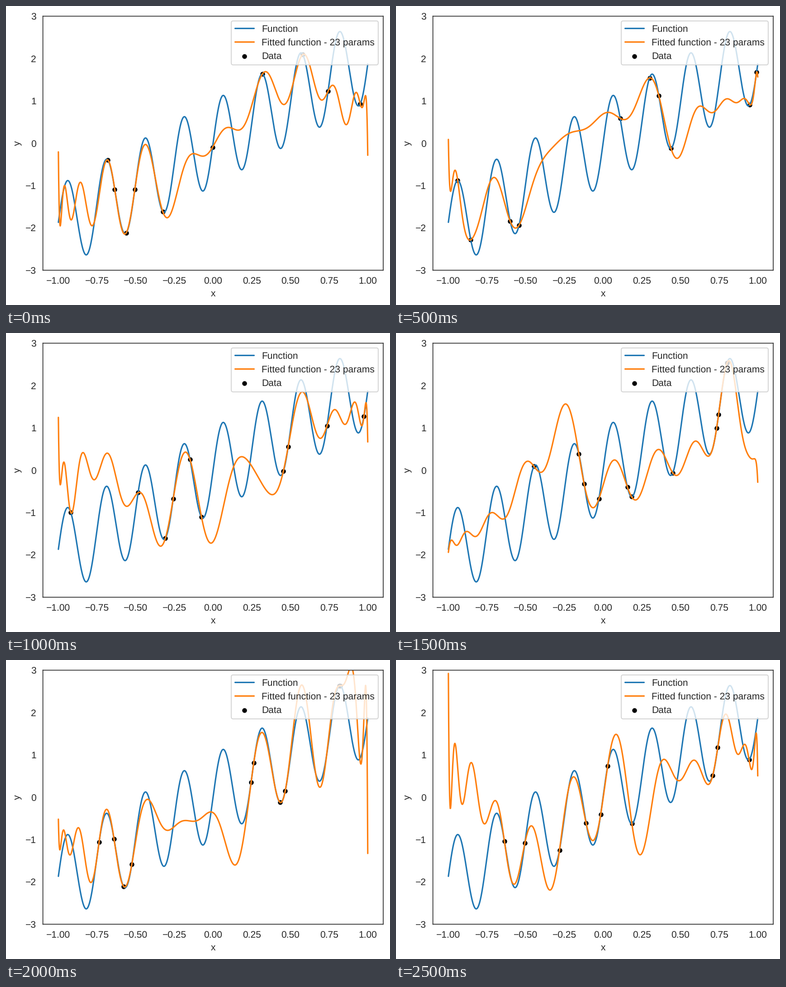
Animation of 849x660 px, one loop 3 s. Source, as a matplotlib script:

```python
import numpy as np
import matplotlib.pyplot as plt
from matplotlib.animation import FuncAnimation
from numpy.polynomial.legendre import legvander

W, H, DPI = 849, 660, 128
PT = 151.7 / DPI  # scale from nominal points to this stage
PARAMS = 23
INK = "0.15"

plt.rcParams.update({
    "font.family": "Liberation Sans",
    "font.size": 10 * PT,
    "text.color": INK,
    "text.hinting": "none",
    "axes.labelcolor": INK,
    "axes.edgecolor": INK,
    "axes.linewidth": 0.8 * PT,
    "axes.labelpad": 4 * PT,
    "lines.linewidth": 1.5 * PT,
    "lines.solid_capstyle": "round",
    "patch.linewidth": 1.0 * PT,
})
for side in ("xtick", "ytick"):
    plt.rcParams.update({
        f"{side}.color": INK,
        f"{side}.major.size": 3.5 * PT,
        f"{side}.major.pad": 3.5 * PT,
    })

# Ten sample positions per fit
SAMPLES = np.array([
    [-.681, -.6354, -.562, -.5059, -.3254, -.0036, .318, .58, .7435, .9515],
    [-.9395, -.8553, -.6005, -.5434, .1107, .3005, .3605, .4392, .949, .9927],
    [-.9197, -.4845, -.308, -.2577, -.1491, -.0747, .4543, .4853, .7364, .9755],
    [-.4467, -.1566, -.1226, -.0269, .1575, .1845, .4506, .734, .7466, .8016],
    [-.7369, -.6405, -.5784, -.525, .2459, .2629, .432, .4663, .816, .823],
    [-.6378, -.5055, -.2815, -.1095, -.0154, .0298, .1863, .7088, .7415, .9436],
])


def func(x):
    return 2 * x + np.sin(25 * x)


def features(x):
    """Legendre polynomials of degree 1 to PARAMS."""
    return legvander(x, PARAMS)[:, 1:]


def fit(x):
    """Smallest-norm coefficients that pass through every sample."""
    return np.linalg.lstsq(features(x), func(x), rcond=None)[0]


grid = np.linspace(-1, 1, 1000)
curves = [features(grid) @ fit(x) for x in SAMPLES]

fig = plt.figure(figsize=(W / DPI, H / DPI), dpi=DPI, facecolor="white")
ax = fig.add_axes([81.6 / W, 1 - 583.3 / H, 752.4 / W, 560.8 / H])
ax.set(xlim=(-1.1, 1.1), ylim=(-3, 3), xlabel="x", ylabel="y",
       xticks=np.linspace(-1, 1, 9), yticks=range(-3, 4))
ax.tick_params(bottom=False, left=False)
for spine in ax.spines.values():
    spine.set_snap(False)

ax.plot(grid, func(grid), color="tab:blue", label="Function")
fitted, = ax.plot(grid, curves[0], color="tab:orange",
                  label=f"Fitted function - {PARAMS} params")
dots = ax.scatter(SAMPLES[0], func(SAMPLES[0]), s=12 * PT**2, color="black",
                  linewidths=1.5 * PT, label="Data")
ax.legend(loc="upper right")


def update(i):
    x = SAMPLES[i]
    fitted.set_ydata(curves[i])
    dots.set_offsets(np.column_stack([x, func(x)]))
    return fitted, dots


anim = FuncAnimation(fig, update, frames=len(SAMPLES), interval=500,
                     repeat=True, repeat_delay=0)
plt.show()
```
